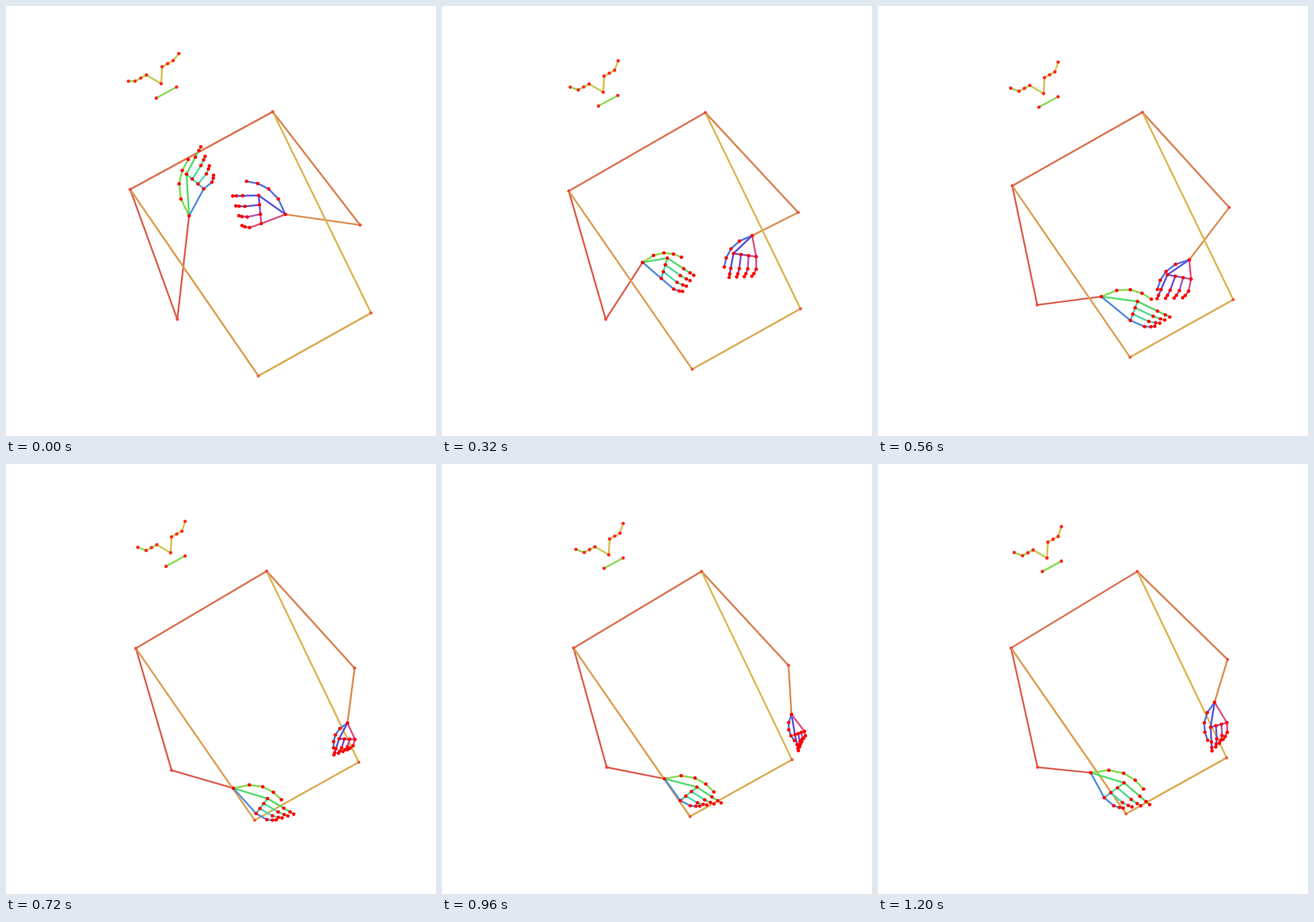
An HTML page with a canvas for the animation above (1.28 s loop, 748 px wide and 748 px high).

```html
<!DOCTYPE html>
<html lang="en">
<head>
<meta charset="utf-8">
<title>Moving skeleton</title>
<style>
  html, body { margin: 0; width: 100%; height: 100%; overflow: hidden; background: #fff; }
  canvas { display: block; width: 100vw; height: 100vh; }
</style>
</head>
<body>
<canvas id="stage" width="748" height="748"></canvas>
<script>
const ctx = document.getElementById('stage').getContext('2d');
const STEP = 80, STEPS = 16;

const add = (a, b, k = 1) => [a[0] + b[0] * k, a[1] + b[1] * k];
const mix = (a, b, t) => add(a, add(b, a, -1), t);

// Head and trunk: each joint drifts from one place to another,
// with one shared bob and one shared sway on top.
function joint(from, to, bob, sway = [0, 0]) {
  return step => {
    const u = step / (STEPS - 1), arch = Math.max(0, Math.sin(Math.PI * u));
    const lift = 1.27 * Math.exp(-(((step - 7) / 1.1) ** 2)) - 0.27 * arch;
    const p = mix(from, to, u + 0.15 * Math.sqrt(arch));
    return add(add(p, bob, lift), sway, Math.sin(2 * Math.PI * u));
  };
}

const joints = {
  nose: joint([270, 135], [294, 163.5], [3, -1], [1.5, 3.5]),
  shoulderL: joint([216, 319], [231.5, 320], [8, -7], [0, 1]),
  shoulderR: joint([464, 184], [451, 187], [4, -1]),
  elbowL: joint([298, 545], [277.5, 527.5], [-7, -15], [-6.5, 4]),
  elbowR: joint([616, 381], [608, 340], [-1.5, -4], [6.5, -6.5]),
  hipL: joint([439, 643.5], [431.5, 608.5], [4, -11]),
  hipR: joint([635, 534], [606.5, 511], [0.5, -9])
};

// Hands: wrist, thumb tip, index knuckle and tip, little knuckle and tip.
// Everything else in a hand follows from these six points.
const leftKeys = [
  { step: 0, at: [318.5,365, 317,267, 314,292.5, 339,245, 344,318, 361,294.5] },
  { step: 2, at: [321.5,409.5, 343,349, 335,366.5, 368,357.5, 352.5,395.5, 373.5,397] },
  { step: 4, at: [349,446, 416.5,437, 392,438.5, 438,468.5, 381.5,474, 418.5,496.5] },
  { step: 7, at: [388.5,505.5, 475.5,510, 451.5,514, 507.5,541, 439,547, 481.5,557] },
  { step: 9, at: [395.5,564, 479,584, 455,582, 500.5,609, 435,608, 470,619] },
  { step: 12, at: [387,547.5, 473,570.5, 443.5,562, 485.5,589.5, 414.5,585.5, 448.5,595] },
  { step: 15, at: [370,537, 462,565.5, 428,554.5, 472.5,592.5, 393.5,580.5, 426.5,598.5] }
];
const rightKeys = [
  { step: 0, at: [486,362.5, 418.5,305, 439.5,329.5, 394.5,330.5, 444,378.5, 410.5,382] },
  { step: 2, at: [511,350.5, 450.5,332, 472.5,338, 449,356, 492,370, 477,383.5] },
  { step: 4, at: [539.5,399.5, 491,454, 507,430.5, 499.5,472, 546.5,436, 539,470] },
  { step: 7, at: [541.5,441.5, 486,493, 503.5,467.5, 485.5,509, 544.5,475, 530,507.5] },
  { step: 9, at: [594,450.5, 570,494, 579.5,478, 570.5,506, 607,479, 594,497] },
  { step: 12, at: [608,435.5, 613,481, 614,471, 620,498.5, 630.5,465, 626,480] },
  { step: 15, at: [585.5,414.5, 573.5,480.5, 578.5,458, 581,499, 607,450, 600.5,479] }
];

const leftHues = {
  fingers: ['#84db52', '#52db6a', '#52db95', '#52d6ab', '#528fdb'],
  knuckles: ['#52db85', '#52dba5', '#52b8cc']
};
const rightHues = {
  fingers: ['#5272db', '#5a52db', '#7452d0', '#b455bc', '#db5285'],
  knuckles: ['#6452db', '#9052c8', '#c852b0']
};

// Smooth curve through the keys, with slopes taken from the neighbours.
function keyPoints(keys, step) {
  const slope = (i, k) => {
    const a = keys[Math.max(i - 1, 0)], b = keys[Math.min(i + 1, keys.length - 1)];
    return (b.at[k] - a.at[k]) / (b.step - a.step);
  };
  let i = 0;
  while (i < keys.length - 2 && step >= keys[i + 1].step) i++;
  const a = keys[i], b = keys[i + 1], span = b.step - a.step;
  const u = (step - a.step) / span, v = 1 - u;
  const value = k => a.at[k] * v * v * (1 + 2 * u) + b.at[k] * u * u * (3 - 2 * u) +
    span * u * v * (slope(i, k) * v - slope(i + 1, k) * u);
  return [0, 2, 4, 6, 8, 10].map(k => [value(k), value(k + 1)]);
}

// Point at t on the parabola through a (t = 0), b (t = m) and c (t = 1).
function bend(a, b, c, m, t) {
  const ka = (t - m) * (t - 1) / m, kb = t * (t - 1) / (m * (m - 1)), kc = t * (t - m) / (1 - m);
  return [0, 1].map(i => a[i] * ka + b[i] * kb + c[i] * kc);
}

// Returns the wrist and five chains of four joints, thumb first.
function buildHand(keys, step, side) {
  const [wrist, thumbTip, indexBase, indexTip, littleBase, littleTip] = keyPoints(keys, step);
  const [dx, dy] = add(thumbTip, wrist, -1);
  const thumbBase = add(mix(wrist, thumbTip, 0.3), [dy, -dx], 0.14 * side);
  const thumb = [thumbBase, ...[0.56, 0.8].map(t => bend(wrist, thumbBase, thumbTip, 0.29, t)), thumbTip];

  const across = add(littleBase, indexBase, -1);
  const width = Math.hypot(...across);
  const fingers = [0, 1, 2, 3].map(f => {
    const base = mix(indexBase, littleBase, f / 3);
    const tip = mix(indexTip, littleTip, f / 3);
    const middle = add(mix(base, tip, 0.62), across, 1.6 * f / width);
    return [base, middle, bend(base, middle, tip, 0.6, 0.85), tip];
  });
  return { wrist, chains: [thumb, ...fingers] };
}

function line(color, ...points) {
  ctx.strokeStyle = color;
  ctx.beginPath();
  points.forEach(p => ctx.lineTo(...p));
  ctx.stroke();
}

function dots(color, r, points) {
  ctx.fillStyle = color;
  for (const [x, y] of points) {
    ctx.beginPath();
    ctx.arc(x, y, r, 0, Math.PI * 2);
    ctx.fill();
  }
}

// A fixed face around the nose, slightly larger and more tilted at the start.
function drawFace(nose, step) {
  const size = 1 + 0.07 * Math.exp(-step / 3);
  const tilt = Math.exp(-step / 2);
  const place = (x, y) => add(nose, [x, y], size);
  const earL = add(place(-57, -9.5), [4, 6], tilt), earR = add(place(25, -54.5), [4, 6], tilt);
  const outL = place(-42.5, -4), inL = place(-24, -14);
  const inR = place(1.5, -27.5), outR = place(19.5, -37.5);
  const mouthL = place(-8, 23.5), mouthR = place(25, 5.5);
  line('#8fd752', earL, outL);
  line('#a9d652', outL, inL);
  line('#c6cc52', inL, nose);
  line('#d9bd52', nose, inR);
  line('#d6c452', inR, outR, earR);
  line('#87db52', mouthL, mouthR);
  dots('#fb2a20', 2.9, [earL, outL, mix(outL, inL, 0.5), inL, nose,
    inR, mix(inR, outR, 0.5), outR, earR, mouthL, mouthR]);
}

function drawTrunk(p, wristL, wristR) {
  line('#db6152', p.shoulderL, p.elbowL, wristL);
  line('#db7252', p.shoulderL, p.shoulderR);
  line('#db8252', p.shoulderR, p.elbowR);
  line('#db9052', p.elbowR, wristR);
  line('#db9f52', p.shoulderL, p.hipL);
  line('#dbab52', p.hipL, p.hipR);
  line('#dbb752', p.shoulderR, p.hipR);
  dots('#f24a3a', 2.7, [p.shoulderL, p.shoulderR, p.elbowL, p.elbowR]);
  dots('#ee5c40', 2.7, [p.hipL, p.hipR]);
}

function drawHand({ wrist, chains }, hues) {
  chains.forEach((chain, f) => {
    const joinsWrist = f < 2 || f === 4;
    line(hues.fingers[f], ...(joinsWrist ? [wrist] : []), ...chain);
  });
  hues.knuckles.forEach((color, k) => line(color, chains[k + 1][0], chains[k + 2][0]));
  dots('#ff0000', 3, [wrist, ...chains.flat()]);
}

function draw(step) {
  const body = {};
  for (const name in joints) body[name] = joints[name](step);
  const left = buildHand(leftKeys, step, 1);
  const right = buildHand(rightKeys, step, -1);
  ctx.fillStyle = '#fff';
  ctx.fillRect(0, 0, 748, 748);
  ctx.lineWidth = 3.2;
  ctx.lineJoin = 'round';
  drawTrunk(body, left.wrist, right.wrist);
  drawFace(body.nose, step);
  drawHand(left, leftHues);
  drawHand(right, rightHues);
}

const start = performance.now();
function tick() {
  draw(Math.floor((performance.now() - start) / STEP) % STEPS);
  requestAnimationFrame(tick);
}
tick();
</script>
</body>
</html>
```
